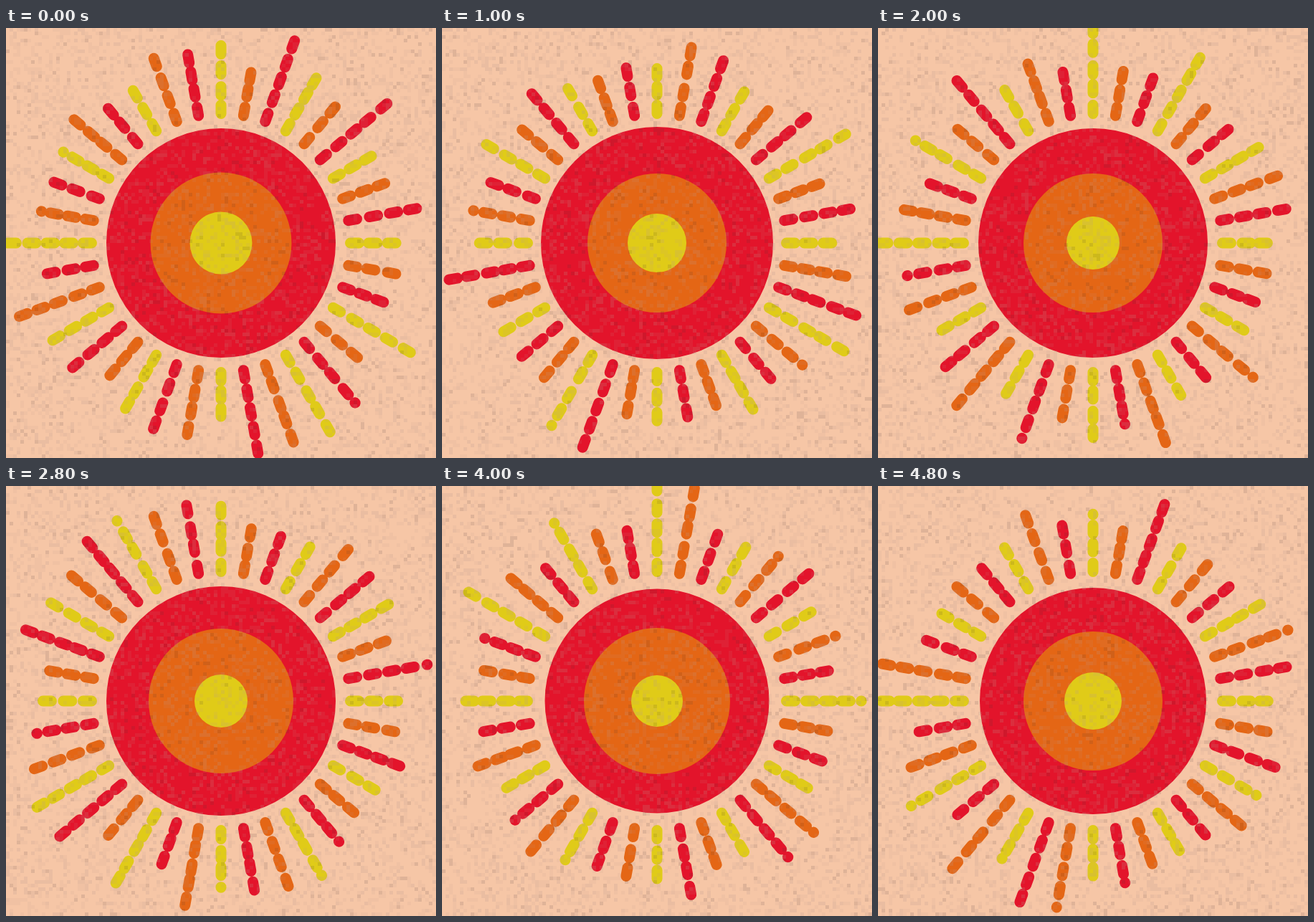
Animation of 600 by 600 pixels, one loop 5000 ms. Source, as an HTML page with a canvas:

```html
<!DOCTYPE html>
<html lang="en">
<head>
<meta charset="utf-8">
<title>Sun</title>
<style>
html, body { margin: 0; width: 100%; height: 100%; overflow: hidden; background: #f6c6a6; }
canvas { display: block; width: 100vw; height: 100vh; }
</style>
</head>
<body>
<canvas id="stage" width="600" height="600"></canvas>
<script>
const ctx = document.getElementById('stage').getContext('2d');
const STEP = 200, STEPS = 25, RAYS = 36, CELL = 5;
const INNER = 180.5, WIDTH = 15, DASH = 12;
const SKIN = '#f6c6a6', RED = '#e3142b', ORANGE = '#e46615', YELLOW = '#e0cb18';
const RAY_COLORS = [YELLOW, ORANGE, RED];
const DISC_COLORS = [RED, ORANGE, YELLOW];

// step, then red, orange and yellow radius
const discs = [
  [0, 160, 98.5, 43.5], [5, 162, 97, 41], [10, 160, 97, 37], [14, 160, 101, 37],
  [16, 156.5, 102, 39], [20, 156.5, 102, 36], [24, 158, 97, 40]
];

function seeded(seed) {
  let s = seed >>> 0;
  return () => {
    s = (s + 0x6d2b79f5) >>> 0;
    let v = Math.imul(s ^ (s >>> 15), s | 1);
    v ^= v + Math.imul(v ^ (v >>> 7), v | 61);
    return ((v ^ (v >>> 14)) >>> 0) / 4294967296;
  };
}

function radii(step) {
  const next = discs.findIndex(d => d[0] >= step);
  const b = discs[next], a = discs[Math.max(0, next - 1)];
  const k = b === a ? 0 : (step - a[0]) / (b[0] - a[0]);
  return [1, 2, 3].map(n => a[n] + (b[n] - a[n]) * k);
}

// A ray is three to five dashes; the last one of a long ray may be a dot.
function drawRay(index, rnd) {
  const pick = rnd();
  const count = pick < 0.42 ? 2 : pick < 0.77 ? 3 : 4;
  const period = 24.3 + rnd() * 4;
  const last = count > 2 && rnd() < 0.3 ? 0.5 : DASH;
  ctx.save();
  ctx.translate(300, 300);
  ctx.rotate(index * Math.PI * 2 / RAYS);
  ctx.strokeStyle = RAY_COLORS[index % 3];
  ctx.beginPath();
  for (let i = 0; i <= count; i++) {
    const shift = i > 0 && i < count ? (rnd() - 0.5) * 4 : 0;
    const from = INNER + i * period + shift;
    ctx.moveTo(0, -from);
    ctx.lineTo(0, -from - (i === count ? last : DASH));
  }
  ctx.stroke();
  ctx.restore();
}

function drawDisc(radius, color) {
  ctx.fillStyle = color;
  ctx.beginPath();
  ctx.arc(300, 300, radius, 0, Math.PI * 2);
  ctx.fill();
}

function drawGrain(rnd) {
  for (let y = 0; y < 600; y += CELL) {
    for (let x = 0; x < 600; x += CELL) {
      const v = rnd();
      if (v > 0.36) continue;
      ctx.fillStyle = v < 0.05 ? 'rgba(70,60,60,.13)'
        : v < 0.17 ? 'rgba(185,150,140,.2)' : 'rgba(185,150,140,.1)';
      ctx.fillRect(x, y, CELL, CELL);
    }
  }
}

function draw(step) {
  const rnd = seeded(step * 977 + 31);
  ctx.fillStyle = SKIN;
  ctx.fillRect(0, 0, 600, 600);
  ctx.lineWidth = WIDTH;
  ctx.lineCap = 'round';
  for (let i = 0; i < RAYS; i++) drawRay(i, rnd);
  radii(step).forEach((r, i) => drawDisc(r, DISC_COLORS[i]));
  drawGrain(rnd);
}

const start = performance.now();
let shown = 0;
draw(0);
function tick(now) {
  const step = Math.floor(Math.max(0, now - start) / STEP) % STEPS;
  if (step !== shown) draw(shown = step);
  requestAnimationFrame(tick);
}
requestAnimationFrame(tick);
</script>
</body>
</html>
```
